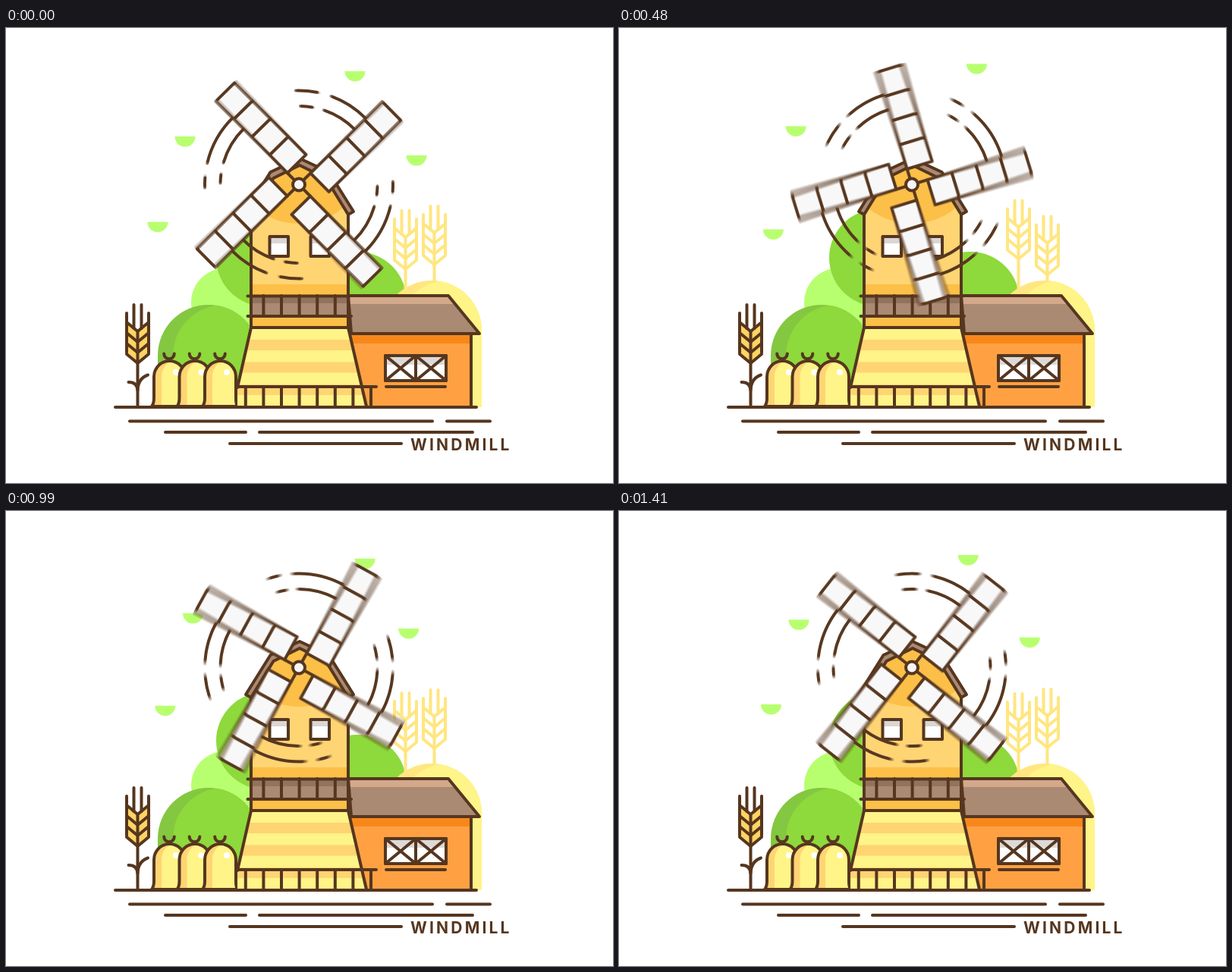
Animation, 800 px wide and 600 px high, one loop 1440 ms. Source, as an HTML page with a canvas:

```html
<!DOCTYPE html>
<html lang="en">
<head>
<meta charset="utf-8">
<title>Windmill</title>
<style>
  html, body { margin: 0; width: 100%; height: 100%; overflow: hidden; background: #fff; }
  canvas { display: block; width: 800px; height: 600px; }
</style>
</head>
<body>
<canvas id="stage" width="800" height="600"></canvas>
<script>
const W = 800, H = 600, LOOP = 1440, STEP = 30, TAU = Math.PI * 2;
const BROWN = '#56361f', AMBER = '#fcbf47', SAND = '#ffd473', LEMON = '#fff488', STRAW = '#ffe680',
      ROOF = '#aa8a72', GREEN = '#8ed93b', MOSS = '#84c741', LIME = '#b8ff70', CLOTH = '#f6f6f6';
const HUB = { x: 386, y: 206.5 }, TOWER_X = 387;

const newLayer = () => {
  const canvas = document.createElement('canvas');
  canvas.width = W;
  canvas.height = H;
  return canvas.getContext('2d');
};
const stage = document.getElementById('stage').getContext('2d');
const sampleLayer = newLayer(), blurLayer = newLayer();

const rad = deg => deg * Math.PI / 180;
const range = n => Array.from({ length: n }, (_, i) => i);

function trace(points, closed = true) {
  const path = new Path2D();
  for (let i = 0; i < points.length; i += 2) path.lineTo(points[i], points[i + 1]);
  if (closed) path.closePath();
  return path;
}
function arc(x, y, r, from = 0, to = 360) {
  const path = new Path2D();
  path.arc(x, y, r, rad(from), rad(to));
  return path;
}
function paint(c, path, fill, stroke) {
  c.lineWidth = 4;
  c.lineCap = c.lineJoin = 'round';
  if (fill) { c.fillStyle = fill; c.fill(path); }
  if (stroke) { c.strokeStyle = stroke; c.stroke(path); }
}
const line = (c, points, color = BROWN) => paint(c, trace(points, false), null, color);
const disc = (c, x, y, r, fill, stroke) => paint(c, arc(x, y, r), fill, stroke);
const box = (c, x1, y1, x2, y2, fill, stroke) =>
  paint(c, trace([x1, y1, x2, y1, x2, y2, x1, y2]), fill, stroke);

function clipped(c, path, draw) {
  c.save();
  c.clip(path);
  draw();
  c.restore();
}

// Left half as [distance from the tower axis, y], mirrored into a whole outline.
function mirrored(half) {
  const left = half.flatMap(([d, y]) => [TOWER_X - d, y]);
  const right = half.slice().reverse().flatMap(([d, y]) => [TOWER_X + d, y]);
  return left.concat(right);
}

// A round-topped mound with its light side shifted to the right.
function mound(c, x, y, r, bottom, shift, shade, light) {
  const shape = new Path2D(`M${x - r} ${bottom} V${y} A${r} ${r} 0 0 1 ${x + r} ${y} V${bottom} Z`);
  paint(c, shape, shade);
  clipped(c, shape, () => {
    disc(c, x + shift, y, r, light);
    box(c, x + shift - r, y, x + r, bottom, light);
  });
}

function wheat(c, x, top, color, stemEnd, fill) {
  const half = 14.5, rise = 12, gap = 14, first = 24;
  c.save();
  c.translate(x, top);
  for (const side of [-1, 1]) {
    const edge = side * half, last = first + 3 * gap;
    if (fill) paint(c, trace([0, first + rise, edge, first, edge, last, 0, last + rise]), fill);
    line(c, [side * 5, 1, side * 5, first + 8], color);
    line(c, [edge, 12, edge, last - 2], color);
    for (const i of range(4)) line(c, [edge, first + i * gap, 0, first + i * gap + rise], color);
  }
  c.restore();
  line(c, [x, top + first + rise, x, stemEnd], color);
}

function sack(c, x) {
  const right = x + 42;
  const shape = new Path2D(`M${x - 2} 499 Q${x + 1} 495 ${x + 1} 488 V460 A20.5 21 0 0 1 ${right} 460
    V488 Q${right} 495 ${right + 2} 499 Z`);
  paint(c, shape, SAND);
  clipped(c, shape, () => {
    disc(c, x + 32, 459, 21, LEMON);
    box(c, x + 11, 459, right + 2, 500, LEMON);
  });
  disc(c, x + 30, 454, 4, '#fff');
  paint(c, shape, null, BROWN);
  paint(c, arc(x + 21, 429.5, 6.8, 0, 180), null, BROWN);
}

function floatingCap(c, frame, x, y, r, start, direction = 1) {
  const a = rad(start + direction * 360 * frame * STEP / LOOP);
  paint(c, arc(x + r * Math.cos(a), y + r * Math.sin(a), 13.5, 0, 180), LIME);
}

function drawBackground(c, frame) {
  // The two pale stalks sway in opposite directions, then rest.
  const sway = frame < 36 ? 7 * (1 - Math.cos(TAU * frame / 36)) : 0;
  disc(c, 463, 360, 65, GREEN);
  wheat(c, 526.5, 240 - sway, STRAW, 350);
  wheat(c, 564.5, 234 + sway, STRAW, 350);
  mound(c, 561, 399, 66, 500, 22, STRAW, LEMON);

  disc(c, 289.5, 362, 45.5, LIME);
  disc(c, 341, 303, 64, GREEN);
  mound(c, 267, 432, 67, 490, 20, MOSS, GREEN);

  floatingCap(c, frame, 468.5, 55.5, 8.7, 170);
  floatingCap(c, frame, 238.5, 135.5, 8, 108);
  floatingCap(c, frame, 531.5, 165, 10, 18);
  floatingCap(c, frame, 204.5, 259.5, 6, 220, -1);
}

function drawHouse(c) {
  const roof = trace([451, 353, 583, 353, 624, 403, 455, 403]);
  box(c, 452, 403, 613, 500, '#ffa142');
  box(c, 452, 403, 613, 416, '#f8871a');
  line(c, [613, 403, 613, 499]);
  paint(c, roof, ROOF);
  clipped(c, roof, () => box(c, 451, 353, 624, 364, '#d3a88b'));
  paint(c, roof, null, BROWN);

  for (const x of [500, 540]) {
    box(c, x, 432, x + 40, 465, '#fff');
    box(c, x, 432, x + 40, 444, '#dcdad8');
    line(c, [x, 432, x + 40, 465]);
    line(c, [x + 40, 432, x, 465]);
    box(c, x, 432, x + 40, 465, null, BROWN);
  }
  line(c, [501, 473, 579, 473]);
}

function drawTowerWindow(c, x) {
  box(c, x, 275, x + 24.5, 301, '#fff');
  box(c, x, 275, x + 24.5, 284, '#d9d6d4');
  box(c, x, 275, x + 24.5, 301, null, BROWN);
}

function drawPosts(c, from, count, top, bottom) {
  for (const i of range(count)) {
    const x = from + 23.6 * i;
    line(c, [x, top, x, bottom]);
  }
}

function drawTower(c) {
  const wall = mirrored([[64, 395], [64, 245], [35, 195], [0, 180]]);
  const eaves = mirrored([[71, 242], [38.5, 190], [0, 172]]);
  const lining = mirrored([[64, 246], [34.5, 198], [0, 181]].reverse());

  paint(c, trace(wall), SAND);
  clipped(c, trace(wall), () => {
    disc(c, 386, 167, 91, AMBER);
    box(c, 323, 338, 451, 395, AMBER);
  });
  line(c, wall);
  const half = lining.length / 2;
  paint(c, trace([...eaves, ...lining.slice(half), ...lining.slice(0, half)]
    .length ? [...eaves, ...mirrored([[-64, 246], [-34.5, 198], [0, 181]])] : eaves), ROOF, BROWN);

  drawTowerWindow(c, 347.5);
  drawTowerWindow(c, 401.5);

  box(c, 323, 353, 451, 380, ROOF);
  box(c, 323, 353, 451, 363, '#92735d');
  drawPosts(c, 339.4, 5, 353, 380);
  line(c, [323, 353, 323, 380]);
  line(c, [451, 353, 451, 380]);
  line(c, [318.5, 353.5, 453, 353.5]);
  line(c, [318.5, 380, 455, 380]);

  const base = trace([323, 395, 451, 395, 475, 500, 305, 500, 305, 473]);
  paint(c, base, LEMON);
  clipped(c, base, () => {
    for (const i of range(3)) box(c, 300, 411 + 29.5 * i, 480, 425 + 29.5 * i, SAND);
  });
  line(c, [305, 474, 323, 395, 451, 395, 475, 499]);
  drawPosts(c, 315.8, 8, 473, 499);
  line(c, [305, 473, 488, 473]);
}

function drawGround(c) {
  const row = (y, ...ends) => {
    for (let i = 0; i < ends.length; i += 2) line(c, [ends[i], y, ends[i + 1], y]);
  };
  row(500, 144, 620);
  row(518.5, 163, 562, 581, 638);
  row(533, 210, 316, 334, 615);
  row(548, 295, 521);
  c.fillStyle = BROWN;
  c.font = '700 21px Inter, "Open Sans", sans-serif';
  c.letterSpacing = '3.2px';
  c.fillText('WINDMILL', 533, 556.5);
}

// One turn per loop, slowest around the start.
function turn(frame) {
  const a = TAU * frame * STEP / LOOP;
  return 45 + 360 * frame * STEP / LOOP
    - 4.6 * Math.sin(a) + 0.6 * (1 - Math.cos(a)) + 0.65 * (1 - Math.cos(2 * a));
}

// A long arc behind a blade, a gap, then a dash; angles in degrees.
function drawTrail(c, r, length, reach) {
  for (const [near, far] of [[0, length], [length + 9, reach]]) {
    paint(c, arc(0, 0, r, -90 - far, -90 - near), null, BROWN);
  }
}

function drawBlade(c) {
  const inner = 21.5, cell = 33.4, width = 34.5;
  line(c, [0, 0, 0, -inner]);
  for (const i of range(4)) {
    const y = -inner - cell * i;
    box(c, 0, y - cell, width, y, CLOTH, BROWN);
  }
}

function drawSails(c, angle) {
  c.clearRect(0, 0, W, H);
  c.save();
  c.translate(HUB.x, HUB.y);
  c.rotate(rad(angle));
  for (const i of range(4)) {
    const odd = i % 2;
    drawTrail(c, 124, 25 + 7 * odd, 47);
    drawTrail(c, 103.5, 26.5 + 2.5 * odd, 44);
    c.rotate(TAU / 4);
  }
  for (const i of range(4)) {
    drawBlade(c);
    c.rotate(TAU / 4);
  }
  c.restore();
}

function drawBlurredSails(c, frame) {
  const samples = 8, shutter = 0.5;
  blurLayer.clearRect(0, 0, W, H);
  blurLayer.globalCompositeOperation = 'lighter';
  blurLayer.globalAlpha = 1 / samples;
  for (const i of range(samples)) {
    const offset = ((i + 0.5) / samples - 0.5) * shutter;
    drawSails(sampleLayer, turn(Math.max(0, frame + offset)));
    blurLayer.drawImage(sampleLayer.canvas, 0, 0);
  }
  c.drawImage(blurLayer.canvas, 0, 0);
  disc(c, HUB.x, HUB.y, 8, CLOTH, BROWN);
}

function drawDarkWheat(c) {
  wheat(c, 173.5, 364, BROWN, 498, '#ffd463');
  paint(c, new Path2D('M161.5 467 Q173 467 173.5 478 Q174 462 187 457.5'), null, BROWN);
}

function render(ms) {
  const frame = Math.floor(ms % LOOP / STEP);
  stage.fillStyle = '#fff';
  stage.fillRect(0, 0, W, H);
  drawBackground(stage, frame);
  drawHouse(stage);
  for (const i of range(3)) sack(stage, 194 + 33.5 * i);
  drawTower(stage);
  drawDarkWheat(stage);
  drawGround(stage);
  drawBlurredSails(stage, frame);
}

let start;
function tick(now) {
  start ??= now;
  render(now - start);
  requestAnimationFrame(tick);
}
render(0);
requestAnimationFrame(tick);
</script>
</body>
</html>
```
